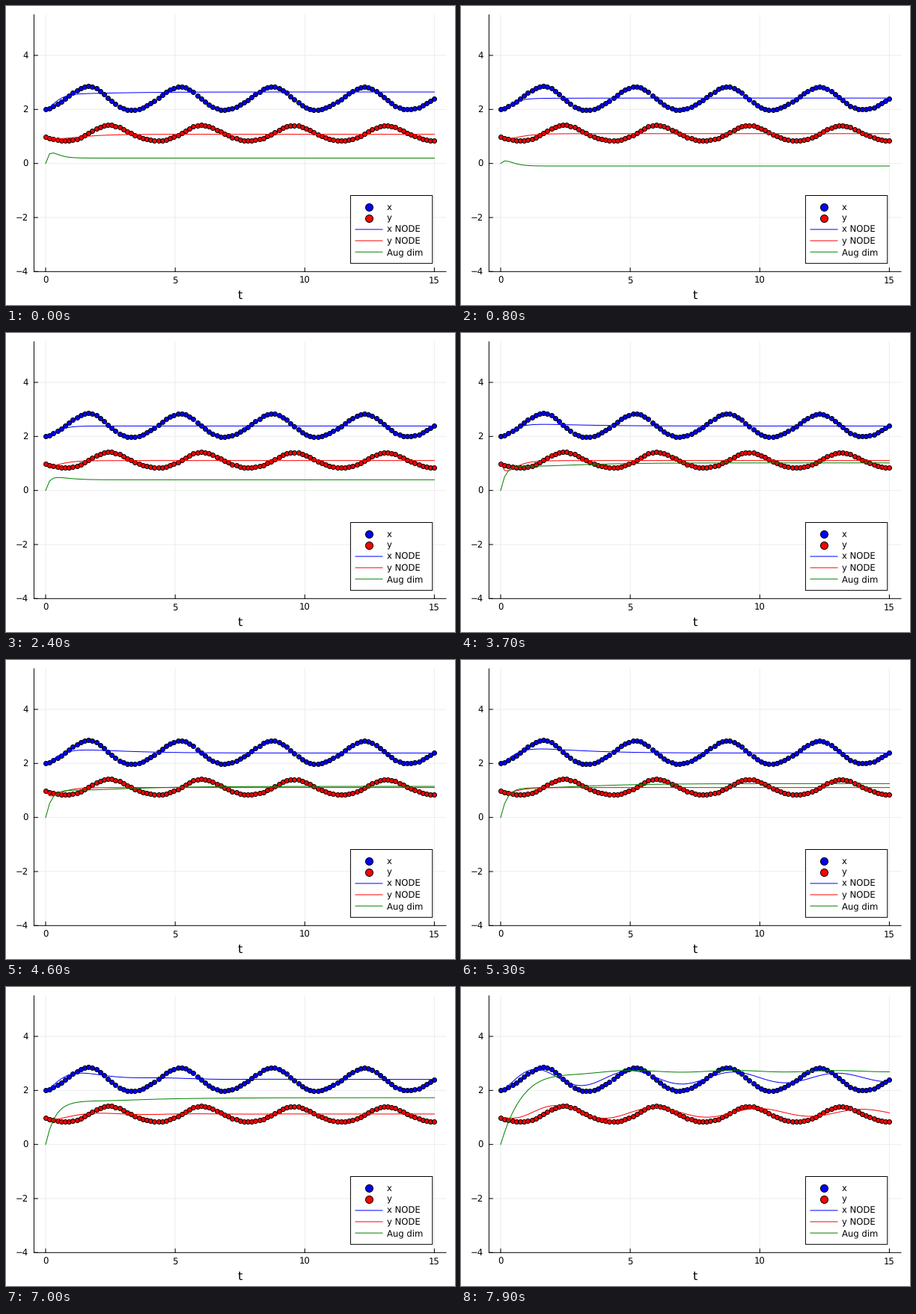
A matplotlib script that plays this animation: 600 px wide and 400 px high, repeating every 8 s.

```python
import numpy as np
import matplotlib.pyplot as plt
from matplotlib.animation import FuncAnimation
from matplotlib.patches import Rectangle

W, H, DPI = 600, 400, 100
FRAMES, INTERVAL = 80, 100
PX = 72 / DPI  # one pixel in points

plt.rcParams.update({"font.family": "DejaVu Sans", "text.hinting": "none",
                     "path.snap": False})
fig = plt.figure(figsize=(W / DPI, H / DPI), dpi=DPI, facecolor="white")
ax = fig.add_axes([0, 0, 1, 1])
ax.set(xlim=(0, W), ylim=(H, 0))
ax.axis("off")

LEFT, RIGHT, TOP, BOTTOM = 37.4, 588, 11.8, 355.3


def px(t):
    return LEFT + (np.asarray(t) + 0.45) * (RIGHT - LEFT) / 15.9


def py(v):
    return BOTTOM - (np.asarray(v) + 4) * (BOTTOM - TOP) / 9.5


def stroke(x, y, color="black", **kw):
    return ax.plot(x, y, color=color, lw=PX, **kw)[0]


def dots(x, y, color, size, **kw):
    ax.plot(x, y, "o", ms=size * PX, mfc=color, mec="black", mew=PX, **kw)


def label(x, y, text, size=8.4, ha="left", **kw):
    ax.text(x, y, text, size=size, ha=ha, va="baseline", **kw)


def predator_prey(ts, steps=10):
    """Slightly damped Lotka-Volterra orbit from (2, 1), RK4."""
    def rate(u):
        x, y = u
        return 1.005 * np.array([x * (1.2445 - 0.004 * x - 1.115 * y),
                                 y * (1.0555 * x - 2.52)])

    u, out = np.array([2.0, 1.0]), []
    h = (ts[1] - ts[0]) / steps
    for _ in ts:
        out.append(u)
        for _ in range(steps):
            a = rate(u)
            b = rate(u + h / 2 * a)
            c = rate(u + h / 2 * b)
            d = rate(u + h * c)
            u = u + h / 6 * (a + 2 * b + 2 * c + d)
    return np.array(out).T


# Axes, grid and ticks
for t in (0, 5, 10, 15):
    x = px(t)
    stroke([x, x], [TOP, BOTTOM], "#ededed", zorder=0)
    stroke([x, x], [BOTTOM, BOTTOM - 5], zorder=1)
    label(x, 371.2, str(t), ha="center")
for v in (-4, -2, 0, 2, 4):
    y = py(v)
    if v > -4:
        stroke([LEFT, RIGHT], [y, y], "#ededed", zorder=0)
    stroke([LEFT, LEFT + 5], [y, y], zorder=1)
    label(29.4, y + 4.1, str(v).replace("-", "\u2212"), ha="right")
stroke([LEFT, LEFT, RIGHT], [TOP, BOTTOM, BOTTOM], zorder=1)
label((LEFT + RIGHT) / 2, 392, "t", size=11.6, ha="center")

# Observed data
ts = np.linspace(0, 15, 101)
for series, color in zip(predator_prey(ts), ("blue", "red")):
    dots(px(ts), py(series), color, 6, zorder=2)

# Legend
ax.add_patch(Rectangle((460.4, 253.5), 109.4, 90.8, fc="white", ec="black",
                       lw=PX, zorder=4))
entries = [("x", "blue"), ("y", "red"), ("x NODE", "blue"),
           ("y NODE", "red"), ("Aug dim", "green")]
for i, (name, color) in enumerate(entries):
    y = 268.7 + 15.1 * i
    if i < 2:
        dots([485], [y], color, 10, zorder=5)
    else:
        stroke([467, 503], [y, y], color, zorder=5)
    label(509, y + 4.2, name, zorder=5)

# Training progress of the third dimension: seconds and key values
KEYS = [0, 0.9, 2.4, 3.7, 6]
AUG_LEVEL = [0.2, -0.13, 0.395, 1.02, 1.355]
AUG_RATE = [8, 8, 8, 5, 3.3]
AUG_BUMP = [3.1, 2.0, 0.75, -0.26, -0.29]
AUG_DECAY = [5, 4.5, 2.8, 0.8, 0.65]

phase = 1.57 * (ts - 1) - 1.3 * np.exp(-0.6 * ts)


def bump(size, decay):
    return size * ts * np.exp(-decay * ts)


def fits(s):
    """The three fitted curves after s seconds of training."""
    late = np.clip((s - 6) / 1.9, 0, 1) ** 2
    early = np.exp(-s / 0.4)
    envelope = late * np.exp(-(0.505 - 0.45 * late) * ts)

    def swing(amp, lag=0):
        return amp * envelope * np.cos(phase - lag)

    def settle(start, goal, fade):
        return goal + (start - goal[0]) * fade

    # x: soft start, a hump that grows, then oscillation
    hump = 0.14 * max(s - 2.5, 0) * (1 - late) - 0.13 * early
    x = settle(2, 2.385 + 0.26 * early + 0.085 * late + swing(0.345),
               (1 + 4 * ts) * np.exp(-4 * ts))
    x = x + bump(hump, 0.85) * (1 - np.exp(-2 * ts))

    # y: an initial dip, deepest around four seconds
    dip = -1.3 + 0.75 * np.exp(-s) - 2.4 * np.exp(-((s - 4) / 0.8) ** 2)
    y = settle(1, 1.107 - 0.027 * early + 0.073 * late + swing(0.265, 1.5),
               np.exp(-(1.5 + 1.5 * late) * ts))
    y = y + bump(dip * (1 - late) + 0.3 * late,
                 4 - 2.4 * np.exp(-s) - 2.5 * late)

    # augmented dimension
    level, rate, size, decay = (
        np.interp(s, KEYS, k)
        for k in (AUG_LEVEL, AUG_RATE, AUG_BUMP, AUG_DECAY))
    aug = settle(0, level + 1.355 * late + swing(0.05),
                 np.exp(-(rate - 2.08 * late) * ts))
    return x, y, aug + bump(size * (1 - late), decay)


lines = [stroke(px(ts), py(0 * ts), c, zorder=3)
         for c in ("blue", "red", "green")]


def update(i):
    for line, values in zip(lines, fits(i * INTERVAL / 1000)):
        line.set_ydata(py(values))
    return lines


anim = FuncAnimation(fig, update, frames=FRAMES, interval=INTERVAL,
                     repeat=True, repeat_delay=0)
plt.show()
```
